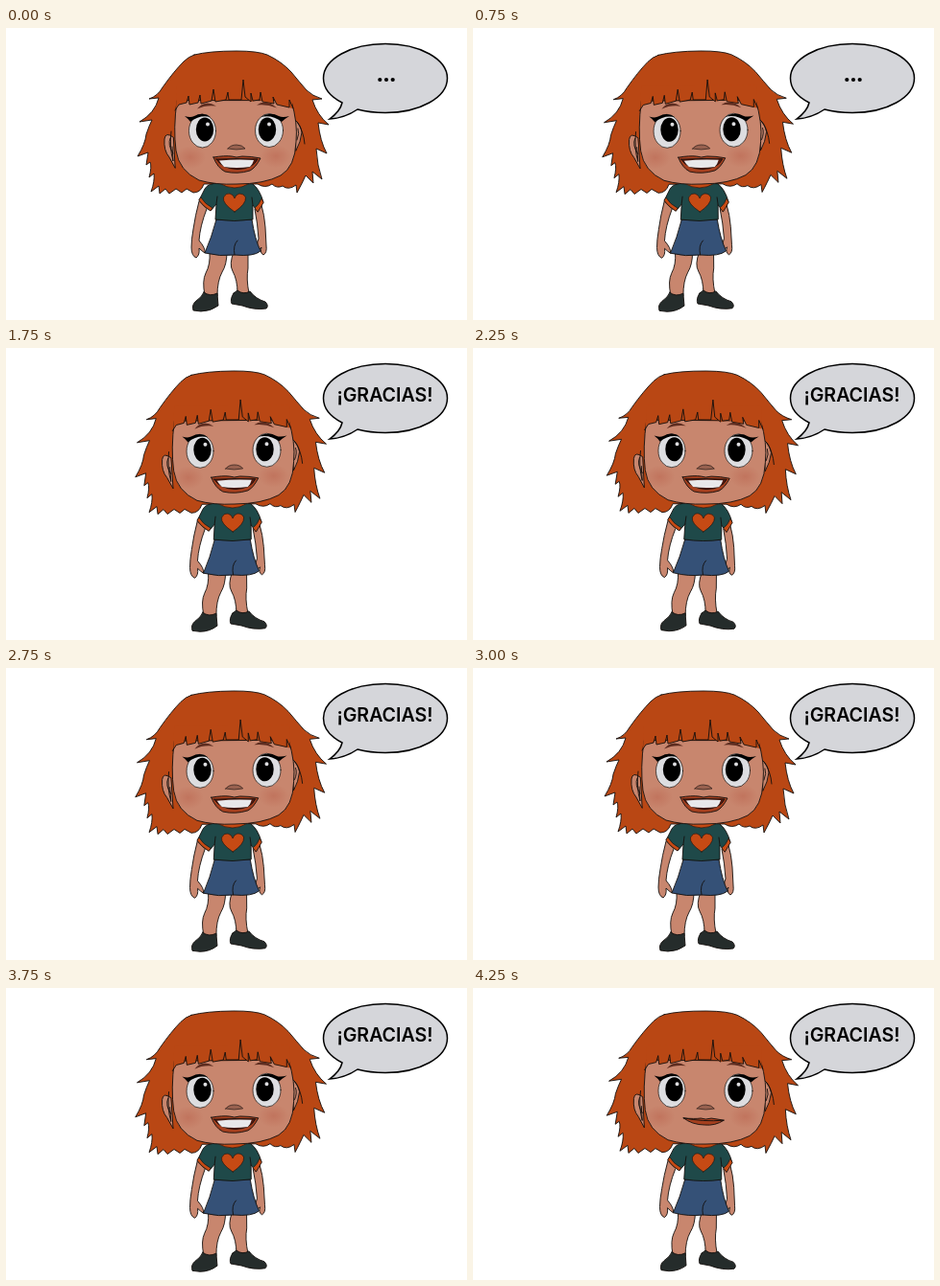
An HTML page that plays this animation: 480 px wide and 305 px high, repeating every 4500 ms.

```html
<!DOCTYPE html>
<html lang="es">
<head>
<meta charset="utf-8">
<title>¡Gracias!</title>
<style>
html, body { margin: 0; width: 100%; height: 100%; overflow: hidden; background: #fff; }
svg { display: block; width: 100vw; height: 100vh; }
#girl { stroke: #15100e; stroke-width: .9; stroke-linejoin: round; stroke-linecap: round; }
.hair { fill: #b94714; }
.skin { fill: #c8866e; }
.shirt { fill: #1f4949; }
.orange { fill: #c64a14; stroke-width: .6; }
.shorts { fill: #355177; }
.shoe { fill: #252c2b; }
.eye { fill: #dddde0; }
.lip { fill: #a5401f; }
.line { fill: none; }
.plain { stroke: none; }
text { font: 600 19.6px Inter, sans-serif; text-anchor: middle; }
</style>
</head>
<body>
<svg viewBox="0 0 480 305">
  <defs>
    <radialGradient id="blush">
      <stop offset="0" stop-color="#b4533f" stop-opacity=".35"/>
      <stop offset="1" stop-color="#b4533f" stop-opacity="0"/>
    </radialGradient>
  </defs>

  <g id="girl">
    <path class="hair" d="M196 28Q212 24 240 24Q262 24 272 28Q287 35 297 46Q306 57 313 65Q319 71 329 74L319 75Q324 91 336 101L325 99Q327 118 334 131L323 126Q324 144 329 158L319 150L320 162L312 154Q309 161 303 172L302 164Q294 170 288 165Q282 168 277 163Q270 168 262 163L206 163Q203 172 195 172L188 168L183 172L177 168L170 173L166 168L160 173L159 165L151 171Q155 160 154 152L149 156Q152 145 150 140L146 143L148 130L137 134Q145 121 146 111Q149 102 152 96L139 98Q155 89 159 73L149 74Q158 71 163 62Q175 45 185 35Q190 30 196 28Z"/>

    <!-- legs and shoes -->
    <path class="skin" d="M212 234Q213 247 208 256Q204 264 207 279L220 280Q220 264 225 255Q230 247 230 234Z"/>
    <path class="skin" d="M237 234Q232 247 236 254Q241 263 241 277L253 277Q250 262 252 251L252 234Z"/>
    <path class="shoe" d="M206 276Q212 281 220 277L221 290Q213 296 203 296L195 295Q193 289 198 285Q204 281 206 276Z"/>
    <path class="shoe" d="M237 277L241 274Q247 279 254 275Q260 283 270 286Q274 290 271 293Q259 295 246 290L235 288Q233 283 237 277Z"/>

    <!-- arms -->
    <path class="skin" d="M201 181Q197 196 195 210Q193 221 193 229Q193 238 198 240Q202 237 201 230Q204 233 207 235Q208 230 201 222Q202 207 209 189Z"/>
    <path class="skin" d="M259 189Q262 204 263 220Q260 228 263 232L266 229Q264 235 268 237Q272 235 271 227L270 208Q269 195 266 185Z"/>

    <!-- clothes -->
    <path class="shorts" d="M219 200L256 200Q259 220 265 233Q258 239 238 237Q223 239 207 235Q214 219 219 200Z"/>
    <path class="line" d="M238 237Q236 227 241 222"/>
    <path class="shirt" d="M222 162Q210 162 207 168L201 180Q206 187 213 191L219 184L218 200Q238 203 257 200L257 185L262 192L268 182Q264 168 257 163Z"/>
    <path class="line" d="M219 184L220 176M257 185L256 177"/>
    <path class="orange" d="M201 180Q205 186 213 191L215 188Q207 184 203 177ZM262 192L259 188Q264 184 266 178L268 182Z"/>
    <path class="orange" d="M222 162Q238 172 254 162L251 160L225 160Z"/>
    <path class="orange" d="M238 192Q225 183 226.500 177Q229 172 233 173Q237 174 238 178Q239 174 243 173Q248 173 249.500 177Q250 184 238 192Z"/>

    <!-- head -->
    <path class="skin" d="M174 114Q166 108 165 116Q164 128 170 135L176 146Z"/>
    <path class="skin" d="M301 96Q307 101 308 109Q307 119 302 128Z"/>
    <path class="line" d="M171 115Q168 122 174 131M304 105Q306 110 303 117"/>
    <path class="skin" d="M178 76Q174 105 177 128Q180 149 201 159Q218 164 240 163Q269 163 286 154Q301 145 302 119Q304 99 297 76Z"/>
    <path class="hair plain" d="M177 84L180 80L188 78L190 71L191 80L200 78L202 70L203 79L214 76L216 64L218 77L229 75L231 67L232 75L245 75L247 54L251 74L255 77L264 75L270 78L279 79L278 72L282 80L298 84L298 60L178 60Z"/>
    <path class="line" d="M176 86L180 80L188 78L190 71L191 80L200 78L202 70L203 79L214 76L216 64L218 77L229 75L231 67L232 75L245 75L247 54L249 72L255 77L255 68L257 76L264 75L265 67L267 77L279 79L278 72L282 80L295 83L295 75L299 84"/>
    <path class="line" d="M303 98Q310 108 311 121M172 108Q170 125 174 139L173 124"/>
    <ellipse class="plain" cx="192" cy="135" rx="16" ry="12" fill="url(#blush)"/>
    <ellipse class="plain" cx="281" cy="134" rx="16" ry="12" fill="url(#blush)"/>

    <!-- eyes, brows, nose -->
    <ellipse class="eye" cx="204.5" cy="107.5" rx="14" ry="17.5" stroke-width=".7"/>
    <ellipse class="eye" cx="274" cy="107" rx="14.5" ry="17.5" stroke-width=".7"/>
    <g class="plain">
      <ellipse cx="207" cy="106" rx="9.2" ry="12.5"/>
      <ellipse cx="272" cy="106" rx="9.2" ry="12.5"/>
      <circle class="eye" cx="210" cy="100.500" r="2"/>
      <circle class="eye" cx="274" cy="100.500" r="2"/>
      <path d="M186 92Q192 94 196 92Q205 87 213 93Q202 90 192 98Q190 95 186 92ZM295 92Q288 94 284 92Q275 87 265 93Q277 90 287 98Q290 95 295 92Z"/>
      <path fill="#5e2d20" d="M199 84.500Q207 74 219 81.500Q208 80 199 84.500ZM261 80.500Q271 73 282 83.500Q271 79 261 80.500Z"/>
    </g>
    <path fill="#98614f" stroke-width=".6" d="M231 126Q234 122 240 122Q246 122 249 126Q240 128 231 126Z"/>

    <g id="smile">
      <path class="lip" d="M216 135Q228 133 235 134L240 135L246 134Q255 134 265 136Q260 146 254 149Q241 153 228 150Q220 146 216 135Z"/>
      <path fill="#54190f" d="M219 137Q240 136 262 137Q257 147 241 147.500Q225 147 219 137Z"/>
      <path class="plain" fill="#e8e8ea" d="M222 138.500Q240 137 258 138Q257 142 254 145Q240 147 227 145Q224 142 222 138.500Z"/>
    </g>
    <g id="shut">
      <path class="lip" d="M217 136Q229 137 235 136L240 137L246 136Q253 137 259 138Q250 144 239 143Q226 143 217 136Z"/>
      <path class="line" d="M217 136Q237 140 259 138"/>
    </g>
  </g>

  <path d="M350 78Q348 87 337 95Q353 94 366 85Q379 88.500 395 88.500C431 88.500 459.500 72.500 459.500 52.500S431 16.500 395 16.500S330.500 32.500 330.500 52.500Q330.500 68 350 78Z" fill="#d5d6da" stroke="#000" stroke-width="1.5"/>
  <g id="dots">
    <circle cx="389.300" cy="54" r="2.100"/>
    <circle cx="396" cy="54" r="2.100"/>
    <circle cx="402.700" cy="54" r="2.100"/>
  </g>
  <text id="thanks" x="394.500" y="55.500">¡GRACIAS!</text>
</svg>
<script>
const STEP = 250, STEPS = 18;
const SWAY = [0, 0.46, 0, -0.46];
const THANKS_AT = 6, SHUT_AT = 17;
const el = id => document.getElementById(id);
const show = (id, on) => el(id).setAttribute('visibility', on ? 'visible' : 'hidden');

function draw(now) {
  const step = Math.floor(now / STEP) % STEPS;
  el('girl').setAttribute('transform', `rotate(${SWAY[step % 4]} 238 415)`);
  show('dots', step < THANKS_AT);
  show('thanks', step >= THANKS_AT);
  show('smile', step !== SHUT_AT);
  show('shut', step === SHUT_AT);
}

let start;
function tick(now) {
  start ??= now;
  draw(now - start);
  requestAnimationFrame(tick);
}
draw(0);
requestAnimationFrame(tick);
</script>
</body>
</html>
```
